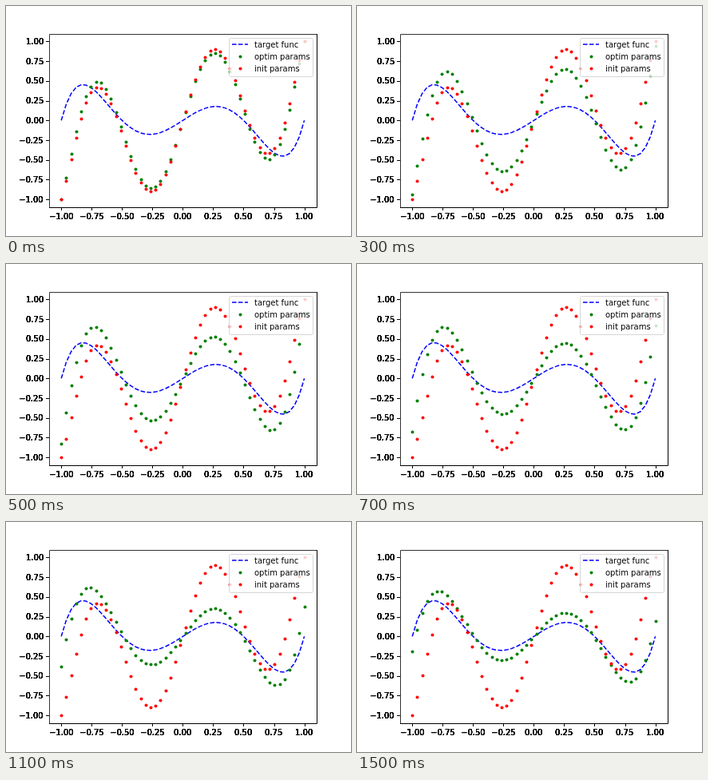
These frames come from a looping animation (432x288 px, 1.6 s). An HTML page:

```html
<!DOCTYPE html>
<html lang="en">
<head>
<meta charset="utf-8">
<title>Curve fit</title>
<style>
  html, body { margin: 0; width: 100%; height: 100%; overflow: hidden; background: #fff; }
  svg { display: block; width: 432px; height: 288px; }
  text { font: 10px "DejaVu Sans", sans-serif; }
  .tick { filter: url(#overprint); }
  .tick path, .edge { fill: none; stroke: #000; }
  .edge.soft { stroke: #333; }
  .target { fill: none; stroke: #00f; stroke-width: 1.5; stroke-dasharray: 5.55 2.4; stroke-linejoin: round; }
  .optim { fill: #008000; }
  .init { fill: #f00; }
  .box { fill: #fff; stroke: #ccc; opacity: .8; }
</style>
</head>
<body>
<svg viewBox="0 0 432 288">
  <!-- Darkens soft glyph edges, as if the labels were printed many times over -->
  <filter id="overprint" color-interpolation-filters="sRGB">
    <feComponentTransfer><feFuncA type="table" tableValues="0 .66 .9 .98 1 1 1 1 1"/></feComponentTransfer>
  </filter>
  <g id="ticks" class="tick"></g>
  <path id="target" class="target"/>
  <g id="optim" class="optim"></g>
  <g id="init" class="init"></g>
  <path class="edge soft" d="M54.5 252V35.5H389"/>
  <path class="edge" d="M389.5 35V252.5H54"/>
  <rect class="box" x="279.5" y="40.5" width="105" height="48" rx="2"/>
  <path class="target" d="M283 48h20"/>
  <circle class="optim" cx="293.5" cy="63.5" r="2"/>
  <circle class="init" cx="293.5" cy="78.5" r="2"/>
  <text x="311" y="52">target func</text>
  <text x="311" y="67">optim params</text>
  <text x="311" y="82">init params</text>
</svg>
<script>
const STEP = 100, STEPS = 16, N = 50;
const $ = id => document.getElementById(id);
const px = x => 54 + (x + 1.1) / 2.2 * 334.8;
const py = y => 143.28 - y * 98.836;
const snap = v => Math.round(v) + .5;
const xs = Array.from({ length: N }, (_, i) => -1 + 2 * i / (N - 1));

function add(parent, tag, attrs, text = '') {
  const el = document.createElementNS('http://www.w3.org/2000/svg', tag);
  for (const k in attrs) el.setAttribute(k, attrs[k]);
  el.textContent = text;
  return parent.appendChild(el);
}

// Weights of the odd Chebyshev terms T1..T9 at some training steps
const INIT = [.476, .184, .613, -.305, .032];
const KEYS = [
  [0, .413, .220, .627, -.288, .028],
  [3, .228, .298, .609, -.210, .014],
  [5, .106, .297, .576, -.157, .008],
  [7, -.003, .251, .533, -.113, .006],
  [9, -.088, .195, .493, -.085, .002],
  [11, -.151, .147, .447, -.067, .001],
  [15, -.217, .079, .380, -.047, -.001]
];

function model(c, x) {
  const a = Math.acos(Math.max(-1, Math.min(1, x)));
  return c.reduce((sum, w, i) => sum + w * Math.cos((2 * i + 1) * a), 0);
}

// Cubic interpolation through the four surrounding keys
function weights(step) {
  let at = 0;
  while (at < KEYS.length - 4 && KEYS[at + 2][0] <= step) at++;
  const near = KEYS.slice(at, at + 4);
  return INIT.map((_, i) => near.reduce((sum, k) => {
    let w = k[i + 1];
    for (const o of near) if (o !== k) w *= (step - o[0]) / (k[0] - o[0]);
    return sum + w;
  }, 0));
}

const dots = (parent, c) => xs.map(x =>
  add(parent, 'circle', { cx: snap(px(x)), cy: snap(py(model(c, x))), r: 2 }));

for (let v = -1; v <= 1; v += .25) {
  const label = (v < 0 ? '\u2212' : '') + Math.abs(v).toFixed(2);
  const width = v < 0 ? 30.65 : 22.27;
  add($('ticks'), 'path', { d: `M${snap(px(v))} 252.5v3.5M54.5 ${snap(py(v))}h-4` });
  add($('ticks'), 'text', { x: Math.round(px(v) - width / 2), y: 267 }, label);
  add($('ticks'), 'text', { x: Math.round(47 - width), y: Math.round(py(v) + 3.6) }, label);
}

$('target').setAttribute('d', 'M' + xs.map(x =>
  px(x).toFixed(2) + ' ' + py(4 * x ** 5 - 5 * x ** 3 + x).toFixed(2)).join('L'));
dots($('init'), INIT);
const optim = dots($('optim'), weights(0));

let shown = 0;
function draw(now) {
  const step = Math.floor(now / STEP) % STEPS;
  if (step !== shown) {
    shown = step;
    const c = weights(step);
    optim.forEach((dot, i) => dot.setAttribute('cy', snap(py(model(c, xs[i])))));
  }
  requestAnimationFrame(draw);
}
requestAnimationFrame(draw);
</script>
</body>
</html>
```
